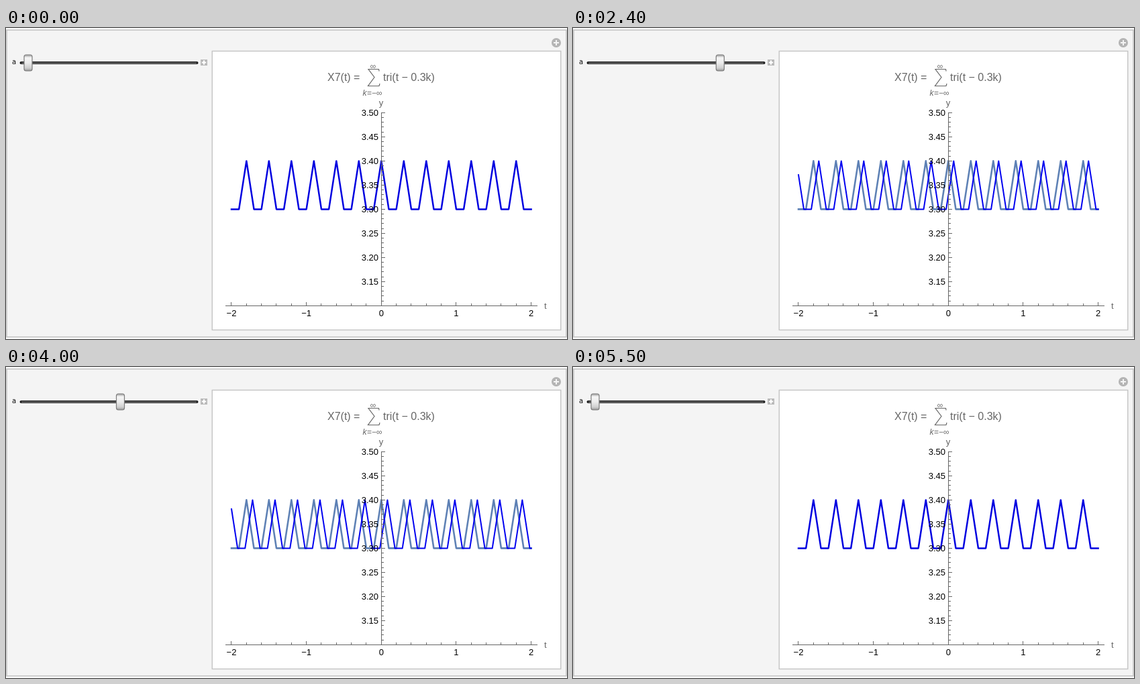
Animation of 836x464 px, one loop 6000 ms. Source, as an HTML page with a canvas:

```html
<!DOCTYPE html>
<html lang="en">
<head>
<meta charset="utf-8">
<title>Shifted triangle train</title>
<style>
html, body { margin: 0; width: 100%; height: 100%; overflow: hidden; background: #fff; }
canvas { display: block; }
</style>
</head>
<body>
<canvas id="stage" width="836" height="464"></canvas>
<script>
const ctx = document.getElementById('stage').getContext('2d');
const LOOP = 6000, STEP = 100, PAUSE = 500, STEPS = 49;
const A_MIN = 0.01, A_MAX = 3;
const PERIOD = 0.3, HALF = 0.1;
const SANS = '"Liberation Sans", Arial, sans-serif';
const GREY = '#666';

const plotX = t => 559.3 + 111.65 * t;
const plotY = v => 270.4 - 720 * (v - 3.3);

// Slider value: rest at zero, then a stepped triangle sweep up and back.
function sliderValue(ms) {
  const i = Math.floor((ms - PAUSE) / STEP);
  if (i < 0 || i > STEPS) return 0;
  return A_MIN + (A_MAX - A_MIN) * Math.min(i, STEPS - i) / (STEPS / 2);
}

function line(x1, y1, x2, y2, color, width = 1, cap = 'butt') {
  ctx.strokeStyle = color;
  ctx.lineWidth = width;
  ctx.lineCap = cap;
  ctx.beginPath();
  ctx.moveTo(x1, y1);
  ctx.lineTo(x2, y2);
  ctx.stroke();
}

function text(str, x, y, size, color = GREY, align = 'left', style = '', family = SANS) {
  ctx.font = `${style} ${size}px ${family}`;
  ctx.fillStyle = color;
  ctx.textAlign = align;
  ctx.fillText(str, x, y);
}

function box(x, y, w, h, fill, stroke, width) {
  ctx.fillStyle = fill;
  ctx.fillRect(x, y, w, h);
  ctx.strokeStyle = stroke;
  ctx.lineWidth = width;
  ctx.strokeRect(x, y, w, h);
}

function plus(x, y, r, color) {
  line(x - r, y, x + r, y, color, 2);
  line(x, y - r, x, y + r, color, 2);
}

function drawPanel() {
  ctx.fillStyle = '#fff';
  ctx.fillRect(0, 0, 836, 464);
  box(1, 3, 834, 458, '#f4f4f4', '#c4c4c4', 1.6);
  box(307.25, 34.5, 519.5, 416, '#fff', '#c4c4c4', 1.4);
  ctx.fillStyle = '#b4b4b4';
  ctx.beginPath();
  ctx.arc(820, 22, 7, 0, 2 * Math.PI);
  ctx.fill();
  plus(820, 22, 4, '#f4f4f4');
}

function drawSlider(a) {
  text('a', 9, 54, 10, '#000', 'left', '', '"DejaVu Sans", sans-serif');
  line(22.5, 52, 284.5, 52, '#1c1c1c', 4, 'round');
  line(23, 52.3, 284, 52.3, '#8c8c8c', 1.2);
  ctx.fillStyle = '#bababa';
  ctx.fillRect(290, 47, 10, 9);
  plus(295, 51.5, 3.2, '#fff');

  const x = 33 + 80 * a;
  const shade = ctx.createLinearGradient(0, 39, 0, 65);
  [[0, '#8a8a8a'], [0.14, '#d0d0d0'], [0.2, '#f6f6f6'], [0.5, '#ececec'],
   [0.8, '#cfcfcf'], [0.88, '#b4b4b4'], [1, '#808080']]
    .forEach(([at, color]) => shade.addColorStop(at, color));
  ctx.beginPath();
  ctx.roundRect(x - 6, 40, 12, 24, 3);
  ctx.fillStyle = shade;
  ctx.fill();
  ctx.strokeStyle = '#7c7c7c';
  ctx.lineWidth = 1.2;
  ctx.stroke();
}

function drawTrain(shift, color, width) {
  const value = t => {
    const d = t - shift - PERIOD * Math.round((t - shift) / PERIOD);
    return 3.3 + Math.max(0, HALF - Math.abs(d));
  };
  const ts = [-2];
  for (let k = Math.ceil((-2.2 - shift) / PERIOD); shift + k * PERIOD < 2.2; k++) {
    for (const off of [-HALF, 0, HALF]) {
      const t = shift + k * PERIOD + off;
      if (t > -2 && t < 2) ts.push(t);
    }
  }
  ts.push(2);
  ctx.beginPath();
  ts.forEach(t => ctx.lineTo(plotX(t), plotY(value(t))));
  ctx.strokeStyle = color;
  ctx.lineWidth = width;
  ctx.lineJoin = 'round';
  ctx.lineCap = 'square';
  ctx.stroke();
}

function drawAxes() {
  line(327, 414.5, 792, 414.5, GREY);
  line(559.5, 126, 559.5, 415, GREY);
  for (let i = -10; i <= 10; i++) {
    const x = Math.floor(plotX(i / 5)) + 0.5, major = i % 5 === 0;
    line(x, 414, x, major ? 409 : 411, GREY);
    if (major) text(String(i / 5).replace('-', '\u2212'), plotX(i / 5), 430, 13, '#000', 'center');
  }
  for (let i = 0; i <= 40; i++) {
    const y = Math.floor(plotY(3.1 + i / 100)) + 0.5, major = i % 5 === 0;
    line(560, y, major ? 565 : 563, y, GREY);
    if (major && i) text((3.1 + i / 100).toFixed(2), 555, y + 4.5, 13, '#000', 'right');
  }
  text('y', 559, 116, 13, GREY, 'center');
  text('t', 802, 419, 13);
}

function drawTitle() {
  text('X7(t) =', 479, 79, 16);
  text('tri(t \u2212 0.3k)', 562, 79, 16);
  text('\u221e', 547, 61, 12, GREY, 'center');
  text('k', 531.5, 101, 12, GREY, 'left', 'italic');
  text('=\u2212\u221e', 538, 101, 12);
  ctx.beginPath();
  [[556, 64.5], [555.5, 61.5], [540, 61.5], [549, 73.5], [539.5, 86.5], [556, 86.5], [557, 83]]
    .forEach(p => ctx.lineTo(...p));
  ctx.strokeStyle = GREY;
  ctx.lineWidth = 1.2;
  ctx.lineCap = 'butt';
  ctx.lineJoin = 'miter';
  ctx.stroke();
}

function draw(now) {
  const a = sliderValue(now % LOOP);
  drawPanel();
  drawSlider(a);
  if (a === 0) {
    drawTrain(0, '#0000e0', 2.5);
  } else {
    drawTrain(0, '#5e81b5', 2.6);
    drawTrain(-a, '#0000f0', 2);
  }
  drawAxes();
  drawTitle();
}

const start = performance.now();
function tick() {
  draw(performance.now() - start);
  requestAnimationFrame(tick);
}
tick();
</script>
</body>
</html>
```
